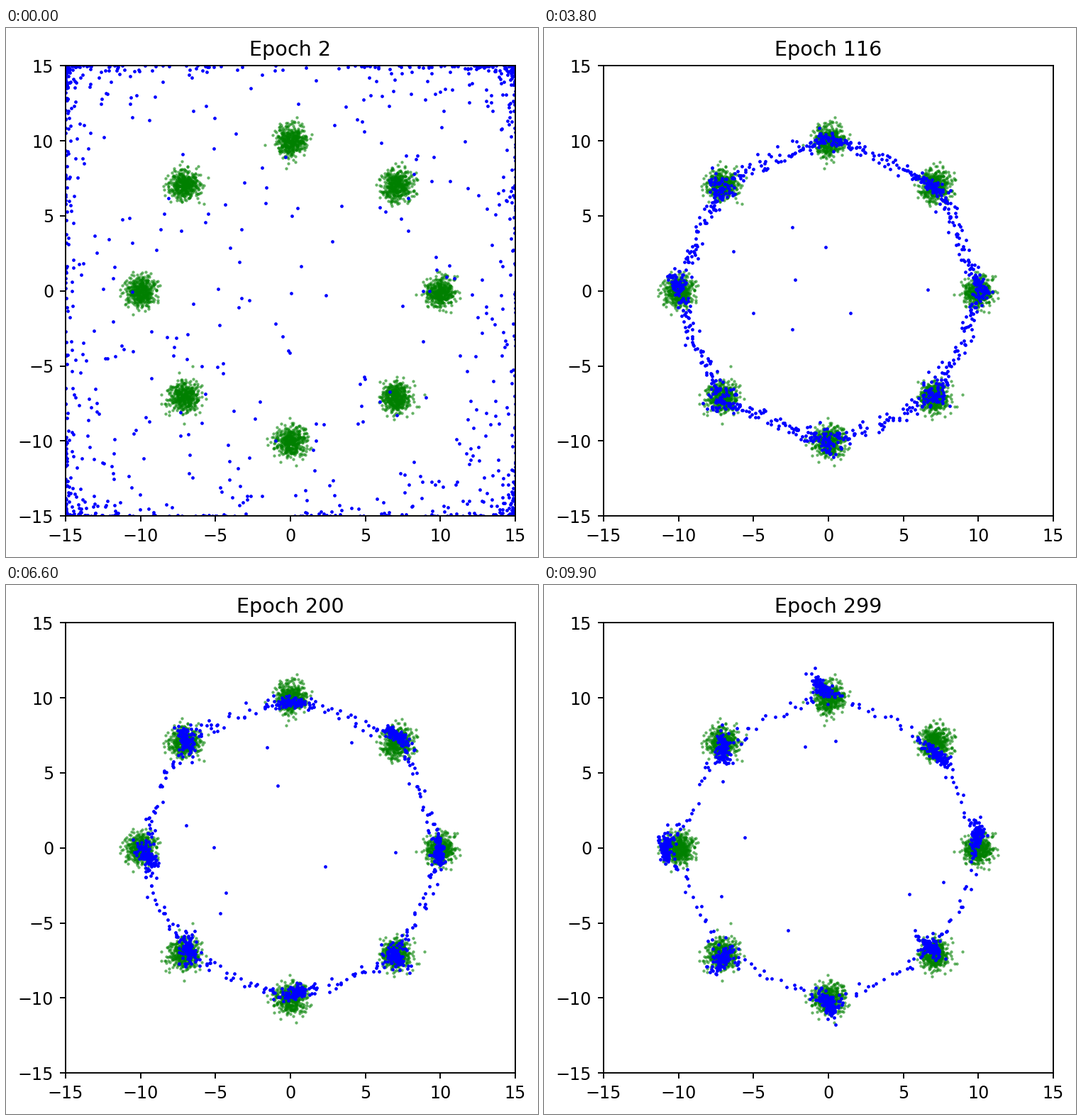
A matplotlib script that plays this animation: 750x746 px, repeating every 10 s.

```python
import matplotlib.pyplot as plt
import numpy as np
from matplotlib.animation import FuncAnimation

W, H, DPI = 750, 746, 128
PT = 172 / DPI              # size of one nominal point
FRAMES, STEP = 100, 100
N = 1000                    # generated samples
MIXED, SETTLED = 22, 38     # frames at which the scatter and the ring are reached

rng = np.random.default_rng(7)
turn = np.arange(8) * np.pi / 4


def polar(r, a):
    return np.stack([r * np.cos(a), r * np.sin(a)], axis=-1)


def rotate(p, a):
    c, s = np.cos(a), np.sin(a)
    return np.stack([p[:, 0] * c - p[:, 1] * s,
                     p[:, 0] * s + p[:, 1] * c], axis=-1)


def by_angle(p):
    return p[np.argsort(np.arctan2(p[:, 1], p[:, 0]))]


def ease(u):
    return u * u * (3 - 2 * u)


modes = polar(10, turn)
real = (modes[:, None] + rng.normal(0, .5, (8, 450, 2))).reshape(-1, 2)


def saturated():
    return by_angle(15 * np.tanh(rng.normal(0, 2.4, (N, 2))))


def scattered():
    """A pile on the left wall, a fan on the right and a thin haze."""
    wall = np.c_[-15 + rng.exponential(.6, 170), rng.normal(-1, 4.6, 170)]
    a = np.radians(rng.normal(-28, 48, 530))
    fan = polar(11 + rng.normal(0, 1.2, 530) - rng.exponential(2.6, 530), a)
    haze = rng.uniform((-13, -8), (7, 3), (190, 2))
    top = rng.uniform((-13, 5), (8, 15), (N - 890, 2))
    return by_angle(np.clip(np.vstack([wall, fan, haze, top]), -15, 15))


start, middle = saturated(), scattered()

# Each sample belongs to a mode and leans towards one neighbour
slot = (np.arange(N) + .5) / N * 8 - 4
mode = np.round(slot).astype(int)
side = slot - mode
lean = modes[(mode + np.sign(side).astype(int)) % 8] - modes[mode % 8]
mode %= 8
blob = rng.normal(0, 1, (N, 2)) * (.5, .2)
fuzz = rng.normal(0, 1, (N, 2))
stray = rng.random(N) < .017
gap = np.where(stray, rng.uniform(.15, .85, N), 0)
phase = rng.uniform(0, 2 * np.pi, N)
spin = rng.uniform(0, 2 * np.pi, (3, 8))


def ring(i):
    t = (i - SETTLED) / (FRAMES - 1 - SETTLED)

    # Modes circle their centres and their streaks swing round
    reach = (.3 + .6 * t) * (.7 + .3 * np.sin(9 * t + spin[0]))
    shift = polar(reach, spin[1] + 7 * t)
    tilt = spin[2] + 2 * np.sin(8 * t + spin[0])

    # Bridges between modes drain over time
    v = np.abs(2 * side) ** (2.2 + 5.8 * t) / 2
    v = np.where(stray, np.abs(side), v)[:, None]
    base = (modes[mode] + lean * v) * (1 + .09 * v * (1 - v))
    grip = np.clip(1 - 3.5 * v, 0, 1)
    p = base + grip * (shift[mode] + rotate(blob, tilt[mode]))
    p += (1 - grip) * fuzz * (.3 - .1 * t)

    # Strays wander inside the ring
    depth = 1 - gap * (1 - .5 * t) + stray * .1 * np.sin(6 * t + phase)
    return rotate(p, stray * .2 * np.sin(4 * t + 2 * phase)) * depth[:, None]


settled = ring(SETTLED)


def samples(i):
    if i >= SETTLED:
        return ring(i)
    if i < MIXED:
        a, b, u = start, middle, i / MIXED
    else:
        a, b, u = middle, settled, (i - MIXED) / (SETTLED - MIXED)
    p = a + (b - a) * ease(u)
    drift = np.c_[np.sin(p[:, 1] / 4 + 1), np.cos(p[:, 0] / 4)]
    return np.clip(p + 1.2 * np.sin(np.pi * u) * drift, -15, 15)


fig = plt.figure(figsize=(W / DPI, H / DPI), dpi=DPI, facecolor="white")
left, right, top, bottom = 84, 718, 53.3, 688.2
ax = fig.add_axes([left / W, 1 - bottom / H,
                   (right - left) / W, (bottom - top) / H])
ticks = range(-15, 16, 5)
ax.set(xlim=(-15, 15), ylim=(-15, 15), xticks=ticks, yticks=ticks)
ax.tick_params(labelsize=10 * PT, length=3.5 * PT, pad=3.5 * PT, width=.8 * PT)
for spine in ax.spines.values():
    spine.set_linewidth(.8 * PT)
title = ax.set_title("", fontsize=12 * PT, pad=6 * PT)

ax.plot(*real.T, "o", color="green", ms=1.8 * PT, mew=0, alpha=.6)
dots, = ax.plot([], [], "o", color="blue", ms=2 * PT, mew=0)


def draw(i):
    dots.set_data(*samples(i).T)
    title.set_text(f"Epoch {2 + 3 * i}")
    return dots, title


anim = FuncAnimation(fig, draw, frames=FRAMES, interval=STEP,
                     repeat=True, repeat_delay=0)
plt.show()
```
